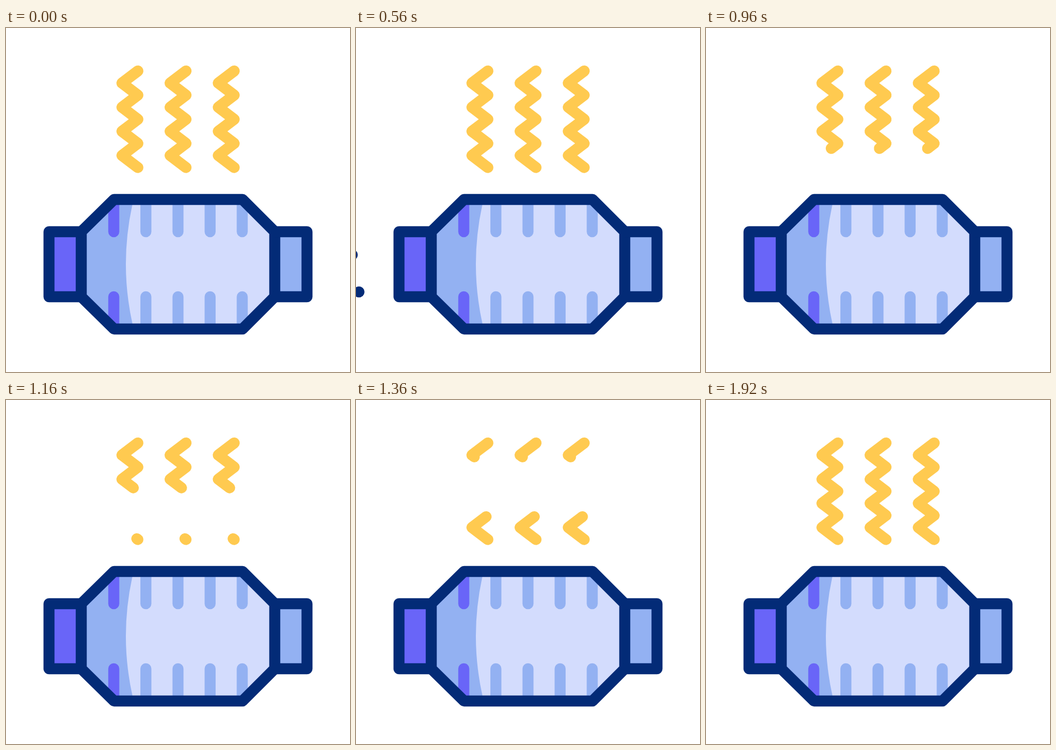
An HTML page for the animation above (2000 ms loop, 640x640 px).

```html
<!DOCTYPE html>
<html lang="en">
<head>
<meta charset="utf-8">
<title>Catalytic converter</title>
<style>
  html, body { margin: 0; width: 100%; height: 100%; overflow: hidden; background: #fff; }
  svg { display: block; width: 100%; height: 100%; }
  .line { fill: none; stroke-width: 20.5; stroke-linecap: round; stroke-linejoin: round; }
  #heat { stroke: #ffca50; }
  #shell { stroke: #032b77; }
  #ribs { stroke: #93b1f2; }
  #dots { fill: #032b77; }
</style>
</head>
<body>
<svg viewBox="0 0 640 640">
  <g id="dots"></g>
  <path fill="#6965f8" d="M80 379H140V500H80Z"/>
  <path fill="#93b1f2" d="M500 379H560V500H500Z"/>
  <path fill="#d3dcfd" d="M140 379 201 319H440L500 379V500L440 560H201L140 500Z"/>
  <path fill="#93b1f2" d="M140 379 201 319H237L235 329Q211 439.5 235 549L237 560H201L140 500Z"/>
  <g id="ribs" class="line"></g>
  <g id="shell" class="line">
    <path d="M140 379 201 319H440L500 379V500L440 560H201L140 500Z"/>
    <path d="M140 379H80V500H140M500 379H560V500H500"/>
  </g>
  <g id="heat" class="line"></g>
</svg>
<script>
const LOOP = 2000, STEP = 40, SEGMENTS = 8;
const $ = id => document.getElementById(id);

function add(parent, tag, attrs) {
  const el = document.createElementNS(parent.namespaceURI, tag);
  for (const key in attrs) el.setAttribute(key, attrs[key]);
  parent.append(el);
  return el;
}

// Ribs along the top and bottom of the shell
for (let i = 0; i < 5; i++) {
  const x = 200.5 + i * 59.75;
  add($('ribs'), 'path', {
    d: `M${x} 325V379M${x} 500V554`,
    ...(i === 0 && { stroke: '#6965f8' })
  });
}

// Each heat wave has a retracting line and a regrowing line
const zigzag = Array.from({ length: SEGMENTS + 1 }, (_, i) =>
  `${i % 2 ? 215.7 : 245.3},${80 + i * 22.45}`).join(' ');
const makeWaves = () => [0, 1, 2].map(i => add($('heat'), 'polyline', {
  points: zigzag, pathLength: SEGMENTS, transform: `translate(${i * 89.6})`
}));
const fading = makeWaves(), growing = makeWaves();

// Exhaust particles: distance behind the leading one, and height
const particles = [
  [0, 461], [25, 413], [113, 491], [125.5, 422],
  [150, 482], [173, 449.5], [188, 467.5]
];
for (const [lag, y] of particles) add($('dots'), 'circle', { cx: -lag, cy: y, r: 10.3 });

// Time and x of the leading particle
const travel = [[0, -96], [240, -10], [400, 47], [720, 190], [1880, 838], [2000, 905]];

function leadX(t) {
  const i = travel.findIndex(([time]) => time > t);
  const [t0, x0] = travel[i - 1], [t1, x1] = travel[i];
  return x0 + (x1 - x0) * (t - t0) / (t1 - t0);
}

function ease(t, start, end) {
  const u = Math.min(1, Math.max(0, (t - start) / (end - start)));
  return u * u * (3 - 2 * u);
}

function trim(lines, length, offset) {
  for (const line of lines) {
    line.style.visibility = length > 0 ? 'visible' : 'hidden';
    line.setAttribute('stroke-dasharray', `${length} 20`);
    line.setAttribute('stroke-dashoffset', -offset);
  }
}

function draw(now) {
  const t = Math.floor(now % LOOP / STEP) * STEP;
  $('dots').setAttribute('transform', `translate(${leadX(t)})`);
  const grown = SEGMENTS * ease(t, 1120, 1880);
  trim(fading, SEGMENTS * (1 - ease(t, 720, 1560)), 0);
  trim(growing, grown, SEGMENTS - grown);
}

const start = performance.now();
function tick() {
  draw(performance.now() - start);
  requestAnimationFrame(tick);
}
tick();
</script>
</body>
</html>
```
